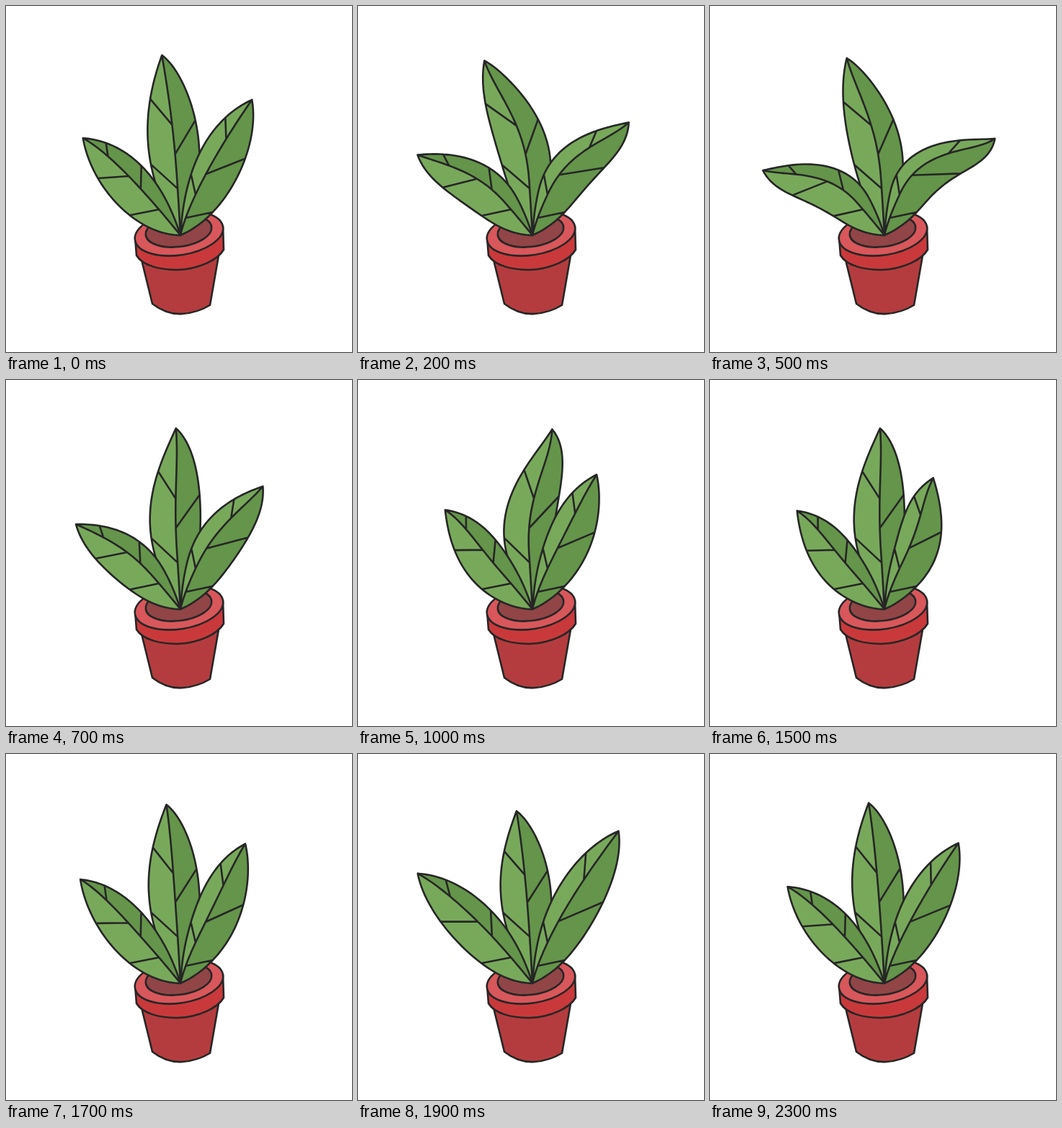
Recreate the animation shown at these times as an HTML page with a canvas. Size 480x480 px, loop 2400 ms.

```html
<!DOCTYPE html>
<html lang="en">
<head>
<meta charset="utf-8">
<title>Swaying plant</title>
<style>
html, body { margin: 0; width: 100%; height: 100%; overflow: hidden; background: #fff; }
canvas { display: block; width: 100vw; height: 100vh; object-fit: contain; }
</style>
</head>
<body>
<canvas id="stage" width="480" height="480"></canvas>
<script>
const ctx = document.getElementById('stage').getContext('2d');
const LOOP = 2400, STEP = 100;
const BASE = [242, 318];
const INK = '#262626', LIGHT = '#78a95b', DARK = '#64954a';

// Edges and rib are cubic curves from the tip to BASE, given by their two handles.
// veins: [edge, place on edge, place on rib]
// lean and stretch: [time, value], eased from key to key; lean in degrees.
const middle = {
  tip: [219, 68],
  light: [[192, 140], [180, 222]],
  dark: [[257, 96], [296, 220]],
  rib: [[232, 150], [237, 230]],
  veins: [['light', 0.27, 0.395], ['dark', 0.47, 0.56], ['light', 0.64, 0.75]],
  lean: [[290, -17.3], [960, 6.3], [1850, -5.3], [2340, -5]],
  stretch: [[1600, 1], [1920, 0.955], [2280, 1]]
};

const left = {
  tip: [106, 183],
  light: [[118, 252], [182, 318]],
  dark: [[160, 187], [213, 226]],
  rib: [[147, 206], [198, 264]],
  veins: [['dark', 0.2, 0.27], ['light', 0.28, 0.48], ['dark', 0.53, 0.6], ['light', 0.6, 0.78]],
  lean: [[400, -63.7], [950, -41.3], [1500, -41.6], [1900, -46.3], [2380, -45]],
  stretch: [[200, 1.015], [1000, 0.957], [1500, 0.953], [1920, 1.15], [2300, 0.99]]
};

const right = {
  tip: [340, 131],
  light: [[288, 155], [248, 213]],
  dark: [[352, 195], [308, 290]],
  rib: [[306, 180], [254, 265]],
  veins: [['light', 0.25, 0.31], ['dark', 0.38, 0.55], ['light', 0.69, 0.69], ['dark', 0.75, 0.86]],
  lean: [[400, 51.5], [880, 26], [1500, 20.4], [1900, 29.5], [2380, 27.7]],
  stretch: [[60, 1], [300, 0.96], [1000, 0.98], [1500, 0.92], [1980, 1.165]]
};

const clamp = v => Math.min(1, Math.max(0, v));
const smooth = s => s * s * (3 - 2 * s);

// Cosine easing through periodic keys.
function eased(keys, t) {
  const n = keys.length;
  const next = keys.findIndex(k => k[0] > t);
  const b = keys[next < 0 ? 0 : next];
  const a = keys[((next < 0 ? 0 : next) + n - 1) % n];
  const span = (b[0] - a[0] + LOOP) % LOOP;
  const s = ((t - a[0] + LOOP) % LOOP) / span;
  return a[1] + (b[1] - a[1]) * (1 - Math.cos(Math.PI * s)) / 2;
}

function polar([x, y]) {
  return [Math.hypot(x - BASE[0], y - BASE[1]), Math.atan2(x - BASE[0], BASE[1] - y)];
}

function cubic(a, [b, c], d, s) {
  const u = 1 - s;
  return a.map((v, i) => u * u * u * v + 3 * u * u * s * b[i] + 3 * u * s * s * c[i] + s * s * s * d[i]);
}

// Bends the leaf around its base; the upper part follows most.
function bender(leaf, t) {
  const [size, rest] = polar(leaf.tip);
  const turn = eased(leaf.lean, t) * Math.PI / 180 - rest;
  const grow = eased(leaf.stretch, t) - 1;
  return p => {
    const [r, a] = polar(p);
    const w = smooth(clamp((r / size - 0.3) / 0.7));
    const len = r * (1 + grow * w), ang = a + turn * w;
    return [BASE[0] + len * Math.sin(ang), BASE[1] - len * Math.cos(ang)];
  };
}

function drawLeaf(leaf, t) {
  const bend = bender(leaf, t);
  const at = (part, s) => bend(cubic(leaf.tip, leaf[part], BASE, s));
  const line = part => Array.from({ length: 41 }, (_, i) => at(part, i / 40));
  const trace = pts => pts.forEach((p, i) => i ? ctx.lineTo(...p) : ctx.moveTo(...p));
  const light = line('light'), dark = line('dark'), rib = line('rib');

  for (const [edge, color] of [[light, LIGHT], [dark, DARK]]) {
    ctx.beginPath();
    trace([...edge, ...[...rib].reverse()]);
    ctx.fillStyle = color;
    ctx.fill();
  }
  ctx.beginPath();
  [light, dark, rib].forEach(trace);
  for (const [edge, i, j] of leaf.veins) trace([at(edge, i), at('rib', j)]);
  ctx.stroke();
}

function paint(path, color) {
  ctx.fillStyle = color;
  ctx.fill(path);
  ctx.stroke(path);
}

function oval(x, y, rx, ry, turn) {
  const p = new Path2D();
  p.ellipse(x, y, rx, ry, turn, 0, 2 * Math.PI);
  return p;
}

const body = new Path2D('M188 352L203 413C217 424 232 428 245 427C260 426 273 421 283 415L295 346Z');
const band = new Path2D('M179 320L181 346C190 361 215 366 238 366C268 365 294 352 302 338L301 306Z');
const rim = oval(240, 315.5, 61.7, 30, -0.15);
const soil = oval(239.5, 312, 46, 22, -0.125);

function draw(t) {
  ctx.fillStyle = '#fff';
  ctx.fillRect(0, 0, 480, 480);
  ctx.strokeStyle = INK;
  ctx.lineWidth = 2.6;
  ctx.lineCap = ctx.lineJoin = 'round';
  paint(body, '#b43c3e');
  paint(band, '#c9393b');
  paint(rim, '#d8575b');
  paint(soil, '#924546');
  for (const leaf of [middle, left, right]) drawLeaf(leaf, t);
}

const start = performance.now();
function tick() {
  const t = (performance.now() - start) % LOOP;
  draw(Math.floor(t / STEP) * STEP);
  requestAnimationFrame(tick);
}
tick();
</script>
</body>
</html>
```
